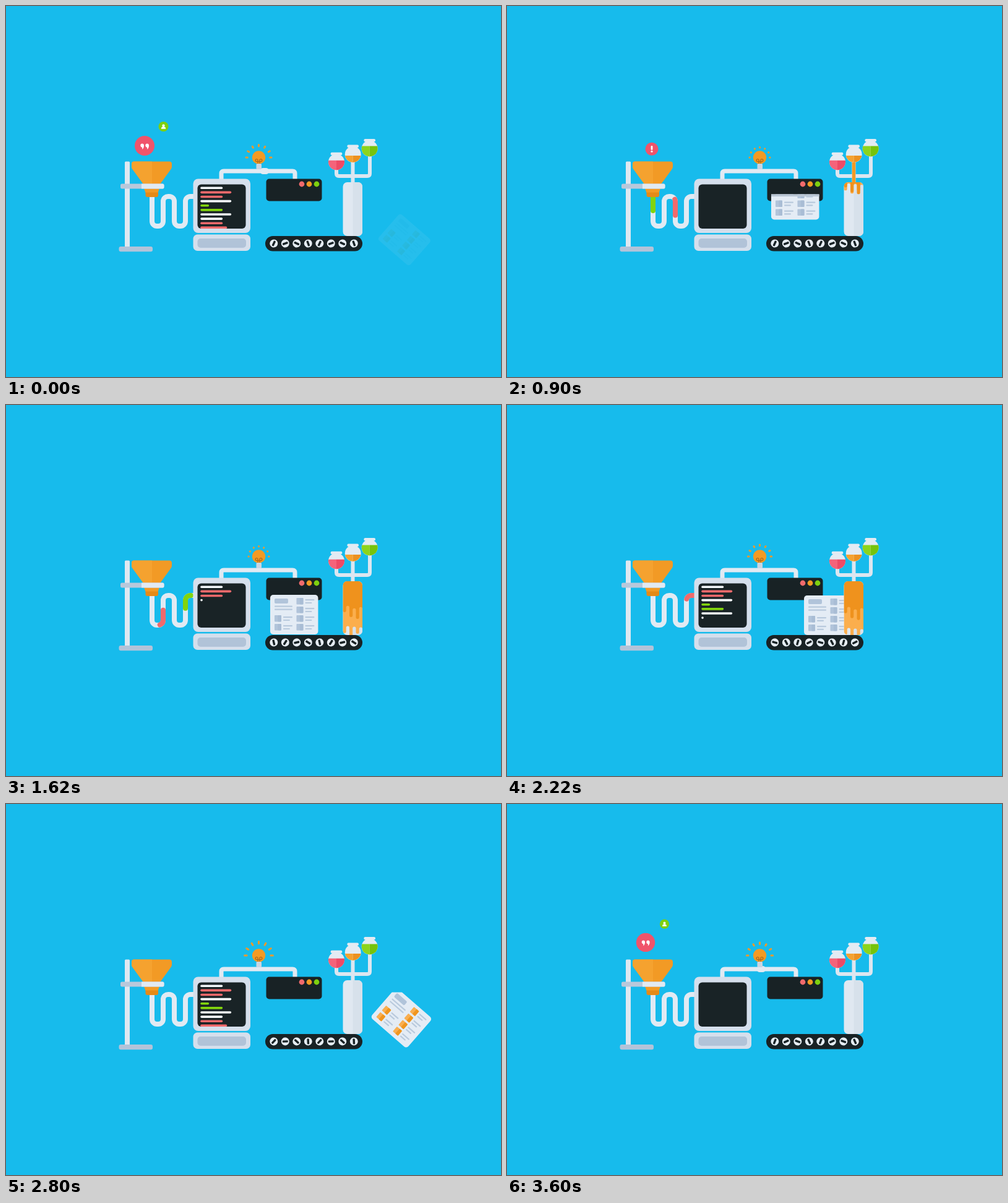
Write an HTML page that moves like this. It is 800 px wide and 600 px high and loops after 3.62 s.

```html
<!DOCTYPE html>
<html lang="en">
<head>
<meta charset="utf-8">
<title>Idea machine</title>
<style>
  html, body { margin: 0; width: 100%; height: 100%; overflow: hidden; background: #17bbec; }
  svg { display: block; width: 800px; height: 600px; }
</style>
</head>
<body>
<svg viewBox="0 0 800 600" xmlns="http://www.w3.org/2000/svg">
  <defs>
    <clipPath id="aboveFunnel"><rect x="180" y="100" width="120" height="156"/></clipPath>
    <clipPath id="belowSlot"><rect x="400" y="304.5" width="400" height="200"/></clipPath>
    <clipPath id="screenClip"><rect x="309.5" y="288.5" width="78" height="71.5" rx="6"/></clipPath>
    <clipPath id="tankClip"><rect x="544.5" y="285" width="31.5" height="87" rx="7"/></clipPath>
  </defs>
  <rect width="800" height="600" fill="#17bbec"/>

  <!-- falling inputs -->
  <g clip-path="url(#aboveFunnel)" fill="#fff">
    <g id="quote">
      <circle r="16" fill="#f0546b"/>
      <path id="mark" d="M-4.2 -3.6a3.2 3.2 0 0 1 3.2 3.2c0 3-1.2 5-3 6.2c.2-1 .3-2 .1-3.1a3.2 3.2 0 0 1-.3-6.3z"/>
      <use href="#mark" x="8"/>
    </g>
    <g id="person">
      <circle r="10.5" fill="#7ed00f"/>
      <circle cy="-2.3" r="2.7"/>
      <path d="M-4.8 5c0-4 2-5 4.8-5s4.8 1 4.8 5z"/>
    </g>
    <g id="alert">
      <circle r="10.5" fill="#f0546b"/>
      <rect x="-1.4" y="-5.2" width="2.8" height="6.8" rx="1.2"/>
      <circle cy="4" r="1.6"/>
    </g>
  </g>

  <!-- stand, pipe and funnel -->
  <rect x="192" y="251.5" width="8" height="140" rx="1.5" fill="#dfe8f1"/>
  <rect x="182.5" y="389" width="54.5" height="8.3" rx="3" fill="#b3c3d9"/>
  <path id="pipe" fill="none" stroke="#e1eaf3" stroke-width="8"
    d="M236 306V348a8 8 0 0 0 8 8h2a8 8 0 0 0 8-8V316a8 8 0 0 1 8-8h2a8 8 0 0 1 8 8V348a8 8 0 0 0 8 8h2a8 8 0 0 0 8-8V316a8 8 0 0 1 8-8H306"/>
  <g id="blobs" fill="none" stroke-width="8" stroke-linecap="round"></g>
  <path d="M207 251.5H264a4 4 0 0 1 4 4V260q0 2-1.5 4L249 288H222L204.500 264Q203 262 203 260V255.500a4 4 0 0 1 4-4z" fill="#f29a25"/>
  <path d="M207 251.5H236V288H222L204.500 264Q203 262 203 260V255.500a4 4 0 0 1 4-4z" fill="#f5a22f"/>
  <path d="M223 295H248L245.500 302H225.500z" fill="#f29a25"/>
  <path d="M225.500 301.500H246V306a3 3 0 0 1-3 3H228.500a3 3 0 0 1-3-3z" fill="#e58a17"/>
  <rect x="185" y="287.5" width="70.500" height="8" rx="2.5" fill="#b9c8db"/>
  <path d="M219 287.5H253a2.500 2.500 0 0 1 2.500 2.500V293a2.500 2.500 0 0 1-2.500 2.500H219z" fill="#e1eaf3"/>

  <!-- wire and bulb -->
  <path id="wire" fill="none" stroke="#e1eaf3" stroke-width="7" d="M348 282V271q0-4 4-4H463q4 0 4 4V282"/>
  <rect id="pulse" x="-6.500" y="-5" width="13" height="10" rx="4" fill="#e1eaf3"/>
  <path id="rays" fill="none" stroke="#ef9a2a" stroke-width="3" stroke-linecap="round"/>
  <circle cx="408.500" cy="245" r="10.700" fill="#f39a23"/>
  <path d="M407 255V250a2 2 0 1 0-2 1.500H412a2 2 0 1 0-2-1.500V255" fill="none" stroke="#a8661b" stroke-width="1.200"/>
  <rect x="404.500" y="255" width="8.500" height="9" rx="1.500" fill="#c9d5e2"/>

  <!-- computer -->
  <rect x="302.500" y="279.500" width="92.500" height="87.500" rx="8" fill="#d5dfec"/>
  <rect x="309.500" y="288.500" width="78" height="71.500" rx="6" fill="#192326"/>
  <g id="code" clip-path="url(#screenClip)" stroke-width="3.600" stroke-linecap="round"></g>
  <rect x="302.500" y="369.500" width="92.500" height="26.500" rx="7" fill="#d5dfec"/>
  <rect x="309.500" y="376" width="78.500" height="15" rx="5" fill="#b1c3d8"/>

  <!-- printer and belt -->
  <rect x="420.500" y="279.500" width="90" height="36" rx="5" fill="#182225"/>
  <circle cx="478" cy="288" r="4.400" fill="#f16a6c"/>
  <circle cx="490" cy="288" r="4.400" fill="#f39a23"/>
  <circle cx="502" cy="288" r="4.400" fill="#7ed00f"/>
  <rect x="419" y="372" width="157" height="24.500" rx="12.250" fill="#182225"/>
  <g id="rollers"></g>
  <g clip-path="url(#belowSlot)"><g id="card"></g></g>
  <rect id="slot" x="427" y="304.500" width="77.500" height="3.500" fill="#b9c6d4"/>

  <!-- paint station -->
  <g fill="none" stroke="#dce6f0" stroke-width="6">
    <path d="M534 262V271q0 4 4 4H584q4 0 4-4V240"/>
    <path d="M560.500 250V288"/>
  </g>
  <path id="stream" fill="none" stroke="#f39a23" stroke-width="5.500"/>
  <g id="flasks"></g>
  <rect x="544.500" y="285" width="31.500" height="87" rx="7" fill="#e0e8f1"/>
  <g clip-path="url(#tankClip)">
    <rect x="560.500" y="285" width="16" height="87" fill="#d7e1eb"/>
    <g id="paint">
      <path id="pale" fill="#fbae4d"/>
      <path id="deep" fill="#ef921d"/>
    </g>
  </g>
</svg>

<script>
const LOOP = 3620;
const RED = '#f16a6c', ORANGE = '#f39a23', GREEN = '#82d40d', WHITE = '#f4f8fb';
const $ = id => document.getElementById(id);
const clamp = v => Math.max(0, Math.min(1, v));
const part = (t, a, b) => clamp((t - a) / (b - a));
const mix = (a, b, u) => a + (b - a) * u;
const smooth = u => u * u * (3 - 2 * u);
const inOut = u => u < .5 ? 4 * u ** 3 : 1 - 4 * (1 - u) ** 3;

function set(el, attrs) {
  for (const k in attrs) el.setAttribute(k, attrs[k]);
  return el;
}
function add(parent, tag, attrs) {
  const el = document.createElementNS('http://www.w3.org/2000/svg', tag);
  return parent.appendChild(set(el, attrs));
}
const show = (el, on) => el.setAttribute('visibility', on ? 'visible' : 'hidden');

// Falling inputs: start time, position, gravity and growth time
const drops = [
  { el: $('quote'), at: 3240, x: 224, y: 205, g: 145, grow: 380 },
  { el: $('person'), at: 3239, x: 254.5, y: 187, g: 55, grow: 500 },
  { el: $('alert'), at: 200, x: 234, y: 160, g: 145, grow: 380 }
];

// Pipe blobs: tail distance s at time t, speed v
const pipeLen = $('pipe').getTotalLength();
const blobs = [
  { color: RED, t: 580, s: 25, v: .31 },
  { color: GREEN, t: 1200, s: 85, v: .288 },
  { color: RED, t: 1620, s: 59, v: .27 }
].map(b => ({ ...b, el: add($('blobs'), 'path', { d: $('pipe').getAttribute('d'), stroke: b.color }) }));
const wireLen = $('wire').getTotalLength();

// Screen lines
const lines = [
  [36, WHITE], [50, RED], [36, RED], [50, WHITE], [14, GREEN],
  [36, GREEN], [50, WHITE], [36, WHITE], [36, RED], [43, RED]
].map(([w, stroke], i) => ({
  w,
  at: 1210 + 129 * i + 2 * i * i,
  el: add($('code'), 'path', { stroke, d: '' }),
  y: 294.2 + 7.13 * i
}));

const rollers = Array.from({ length: 8 }, (_, i) => {
  const g = add($('rollers'), 'g', {});
  add(g, 'circle', { r: 6.5, fill: '#e6edf3' });
  add(g, 'rect', { x: -4.5, y: -1.7, width: 9, height: 3.4, rx: 1.2, fill: '#182225' });
  return { g, x: 432.8 + 18.5 * i };
});

// Card, drawn around its centre
const CW = 77.5, CH = 64, card = $('card'), squares = [];
const box = (x, y, width, height, fill, rx = 1) =>
  add(card, 'rect', { x: x - CW / 2, y: y - CH / 2, width, height, rx, fill });
box(0, 0, CW, CH, '#e4ecf5', 5);
box(7, 6, 22, 8, '#b1c4da', 2);
for (const y of [17.5, 22.5]) box(7, y, 29, 2.2, '#b9cadd');
for (const [x, y] of [[7, 33], [7, 47], [42.5, 5], [42.5, 19], [42.5, 33], [42.5, 47]]) {
  const left = box(x, y, 11, 10.5, '#b1c4da');
  const right = box(x + 5.5, y, 5.5, 10.5, '#a9bdd5');
  squares.push({ left, right, x });
  box(x + 14, y + 2, 15, 2.2, '#b9cadd');
  box(x + 14, y + 6.8, 11, 2.2, '#b9cadd');
}

function flask(x, y, level, light, dark) {
  const g = add($('flasks'), 'g', { transform: `translate(${x} ${y})` });
  const dx = Math.sqrt(169 - level * level);
  add(g, 'circle', { r: 13, fill: '#e3ebf3' });
  add(g, 'rect', { x: -7, y: -14, width: 14, height: 6, fill: '#e3ebf3' });
  add(g, 'rect', { x: -9.3, y: -15.5, width: 18.6, height: 4.5, rx: 2, fill: '#e3ebf3' });
  add(g, 'path', { d: `M${-dx} ${level}H0V13A13 13 0 0 1 ${-dx} ${level}z`, fill: light });
  add(g, 'path', { d: `M${dx} ${level}H0V13A13 13 0 0 0 ${dx} ${level}z`, fill: dark });
}
flask(534, 252.3, -2.5, '#f4637a', '#ee4b66');
flask(560.7, 240, 2, '#f5a22f', '#ec9120');
flask(587.7, 230.5, -4, '#8cd41c', '#76c30c');

// Paint sheet whose lower edge alternates hanging drips and gaps
function sheet(y, lens) {
  const w = 31.5 / 6;
  let d = `M544.5 280V${y}`;
  lens.forEach((len, i) => {
    d += `V${y + len}a${w / 2} ${w / 2} 0 0 ${i % 2 ? 1 : 0} ${w} 0`;
  });
  return d + 'V280z';
}

function drawCard(t) {
  const ghost = t < 300;
  const x = mix(465.7, 640, inOut(clamp((t - 1687) / 1260)));
  const tip = smooth(part(t, 2400, 2770));
  const fall = part(t, 2820, 3210);
  const out = 1 - (1 - part(t, 200, 1700)) ** 1.45;
  const feed = mix(306 - CH / 2, 340, out);
  const printing = t >= 200 && t < 1687;
  const pose = (px, py, a, s) => `translate(${px} ${py}) rotate(${a}) scale(${s})`;
  const inPrinter = t >= 300 || !ghost;

  if (ghost) {
    set(card, { transform: pose(644, 378, 41, .87), opacity: .07 * (1 - t / 300) });
  } else {
    const y = t < 1700 ? feed : 340 + 6 * tip + 32 * fall * fall;
    set(card, { transform: pose(x + 4 * fall, y, 41 * tip, 1 - .13 * fall), opacity: 1 - smooth(fall) });
  }
  show(card, fall < 1);
  show($('slot'), printing && inPrinter && out < .92);
  for (const s of squares) {
    const painted = ghost || x - CW / 2 + s.x + 5 > 560;
    s.left.setAttribute('fill', painted ? '#f9ae50' : '#b1c4da');
    s.right.setAttribute('fill', painted ? '#f0961f' : '#a9bdd5');
  }
}

function drawPaint(t) {
  const head = mix(250, 287, part(t, 420, 560));
  const tail = mix(250, 287, part(t, 1260, 1450));
  set($('stream'), { d: `M560.5 ${tail}V${head}` });
  show($('stream'), head > tail);

  const u = part(t, 700, 1650);
  const drain = 95 * smooth(part(t, 2380, 2720));
  set($('pale'), { d: sheet(mix(268, 361, u), [8, 2, 13, 3, 9, 4]) });
  set($('deep'), { d: sheet(mix(276, 331, u), [3, -2, 11, 2, 14, 0]) });
  set($('paint'), { transform: `translate(0 ${drain})` });
  show($('paint'), t > 700 && t < 2720);
}

function draw(t) {
  for (const d of drops) {
    const age = (t - d.at + LOOP) % LOOP;
    const y = d.y + d.g * (age / 1000) ** 2;
    show(d.el, y < 275);
    set(d.el, { transform: `translate(${d.x} ${y}) scale(${clamp(age / d.grow)})` });
  }

  for (const b of blobs) {
    const s = b.s + (t - b.t) * b.v;
    const from = Math.max(0, s), to = Math.min(pipeLen, s + 26);
    show(b.el, to > from);
    if (to > from) set(b.el, { 'stroke-dasharray': `${to - from} 999`, 'stroke-dashoffset': -from });
  }

  const run = ((t - 3383 + LOOP) % LOOP) * .35;
  show($('pulse'), run < wireLen);
  if (run < wireLen) {
    const p = $('wire').getPointAtLength(run);
    const turn = run < 12 || run > wireLen - 12 ? 90 : 0;
    set($('pulse'), { transform: `translate(${p.x} ${p.y}) rotate(${turn})` });
  }

  const glow = .5 + .5 * Math.cos(2 * Math.PI * (t - 565) / (LOOP / 5));
  let rays = '';
  for (let i = 0; i < 7; i++) {
    const a = Math.PI * i / 6, c = Math.cos(a), s = Math.sin(a);
    const at = r => `${408.5 + r * c} ${245 - r * s}`;
    rays += `M${at(16.2 + 3.4 * glow)}L${at(16.4 + 7 * glow)}`;
  }
  set($('rays'), { d: rays });

  const full = t < 900;
  for (const l of lines) {
    const u = full ? 1 : part(t, l.at, l.at + 140);
    show(l.el, u > 0 && t < 3400);
    set(l.el, { d: `M316 ${l.y}h${Math.max(.01, l.w * u - 3.6)}` });
  }

  rollers.forEach((r, i) => {
    const a = -65 + 45 * i + 720 * t / LOOP;
    set(r.g, { transform: `translate(${r.x} 384) rotate(${a})` });
  });

  drawCard(t);
  drawPaint(t);
}

const begin = performance.now();
function tick(now) {
  draw(Math.max(0, now - begin) % LOOP);
  requestAnimationFrame(tick);
}
draw(0);
requestAnimationFrame(tick);
</script>
</body>
</html>
```
